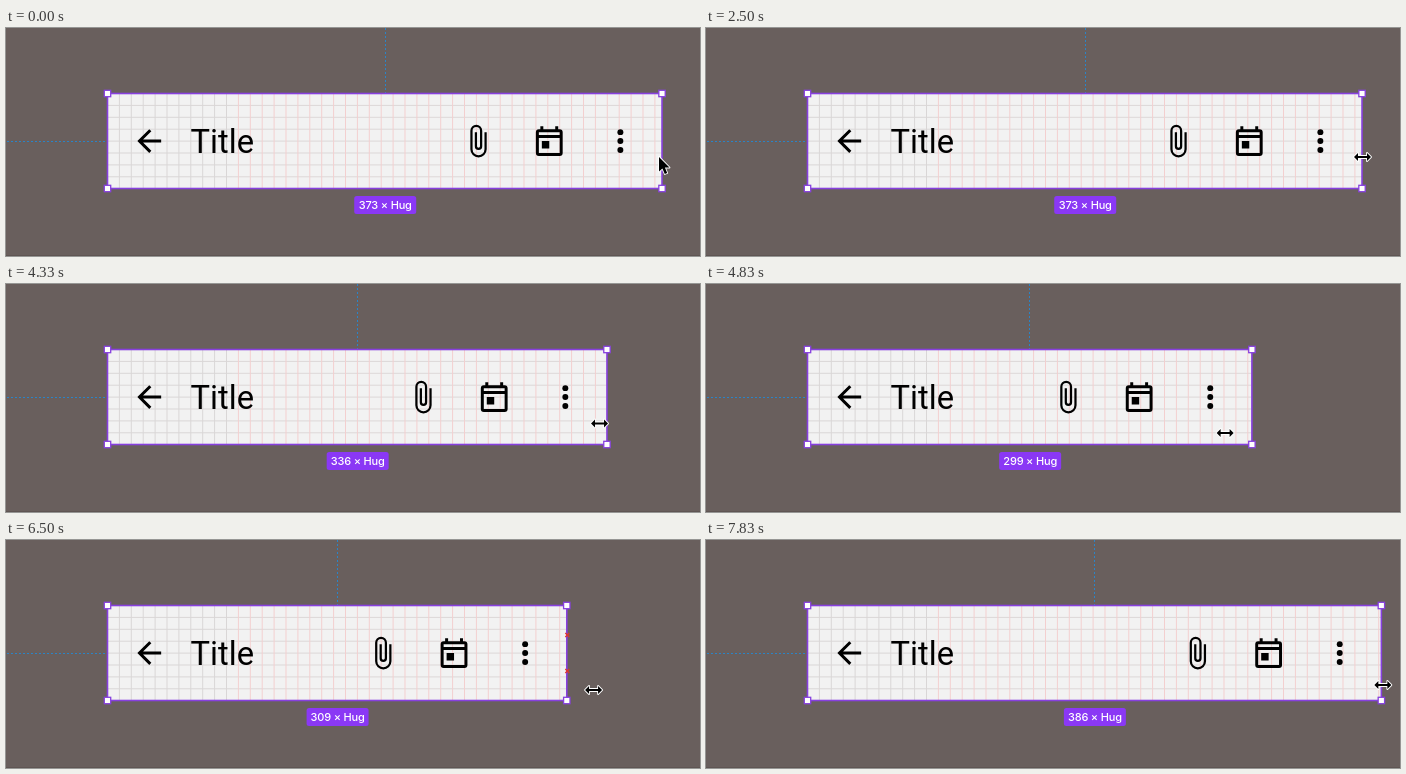
Write an HTML page that moves like this. It is 694 px wide and 228 px high and loops after 8 s.

```html
<!DOCTYPE html>
<html lang="en">
<head>
<meta charset="utf-8">
<title>Resizing an app bar</title>
<style>
  html, body { margin: 0; width: 100%; height: 100%; overflow: hidden; background: #695f5d; }
  svg { display: block; width: 100%; height: 100%; }
  .guide { stroke: #2b84c6; stroke-width: 1; stroke-dasharray: 2 2; }
  .outline { fill: none; stroke: #8740de; stroke-width: 1.6; }
  .handle { fill: #fff; stroke: #8740de; stroke-width: 1.3; }
  .title { font: 400 32.7px Roboto, sans-serif; }
  .size { font: 500 11px Inter, sans-serif; letter-spacing: -.2px; fill: #fff; text-anchor: middle; }
  .cursor { stroke: #fff; stroke-width: 1.8; stroke-linejoin: round; paint-order: stroke; }
  .mark { fill: none; stroke: #e0342b; stroke-width: 1.2; }
</style>
</head>
<body>
<svg viewBox="0 0 694 228">
  <defs>
    <pattern id="cells" patternUnits="userSpaceOnUse" x="101" y="65" width="11.9" height="11.9">
      <path d="M0 .5H11.9M.5 0V11.9" stroke="#d9d6d6"/>
    </pattern>
    <pattern id="pinkCells" patternUnits="userSpaceOnUse" x="101" y="65" width="11.9" height="11.9">
      <path d="M0 .5H11.9" stroke="#dcd7d7"/>
      <path d="M.5 0V11.9" stroke="#f3cfcf"/>
    </pattern>
    <path id="mark" class="mark" d="M-2-2 2 2M-2 2 2-2"/>
    <rect id="handle" class="handle" x="-3.2" y="-3.2" width="6.4" height="6.4"/>
  </defs>

  <rect width="694" height="228" fill="#695f5d"/>
  <rect y="227" width="694" height="1" fill="#5f5553"/>
  <path class="guide" d="M1 113.5H101"/>
  <path class="guide" id="topGuide" d="M.5 0V65"/>

  <rect id="bar" x="101" y="65" height="95.5" fill="#f2f2f2"/>
  <rect x="101" y="65" width="125" height="95.5" fill="url(#cells)"/>
  <rect id="pinkGrid" x="226" y="65" height="95.5" fill="url(#pinkCells)"/>

  <g transform="translate(125.4 95.2) scale(1.488)">
    <path d="M20 11H7.83l5.59-5.59L12 4l-8 8 8 8 1.41-1.41L7.83 13H20z"/>
  </g>
  <text class="title" x="184.6" y="125">Title</text>

  <g id="actions">
    <g transform="translate(-202.1 95.2) scale(1.488)">
      <path d="M16.5 6v11.5a4 4 0 0 1-8 0V5a2.5 2.5 0 0 1 5 0v10.5a1 1 0 0 1-2 0V6H10v9.5a2.5 2.5 0 0 0 5 0V5a4 4 0 0 0-8 0v12.5a5.5 5.5 0 0 0 11 0V6z"/>
    </g>
    <g transform="translate(-130.6 95.2) scale(1.488)">
      <path fill-rule="evenodd" d="M19 4h-1V2h-2v2H8V2H6v2H5a2 2 0 0 0-2 2v14a2 2 0 0 0 2 2h14a2 2 0 0 0 2-2V6a2 2 0 0 0-2-2zM19 20H5V10h14zM19 8H5V6h14zM7 12h5v5H7z"/>
    </g>
    <g transform="translate(-59.5 95.2) scale(1.488)">
      <circle cx="12" cy="6" r="2"/><circle cx="12" cy="12" r="2"/><circle cx="12" cy="18" r="2"/>
    </g>
  </g>

  <rect id="outline" class="outline" x="101.5" y="65.5" height="95"/>
  <use href="#handle" x="101.5" y="65.5"/>
  <use href="#handle" x="101.5" y="160.5"/>
  <g id="rightEdge">
    <use href="#handle" y="65.5"/>
    <use href="#handle" y="160.5"/>
    <g id="marks"><use id="upperMark" href="#mark"/><use id="lowerMark" href="#mark"/></g>
  </g>

  <g id="badge">
    <rect x="-31" y="168" width="62" height="18" rx="2.5" fill="#8a38f5"/>
    <text class="size" id="size" y="181"></text>
  </g>

  <path id="arrow" class="cursor" d="M0 0V14.5L3.4 11.4 5.8 17 8.2 16 5.9 10.6H10.5Z"/>
  <path id="resizer" class="cursor" d="M-8.5 0-4.5-4V-1H4.5V-4L8.5 0 4.5 4V1H-4.5V4Z"/>
</svg>
<script>
const LOOP = 8000, STEPS_PER_MS = 6 / 1000;
const LEFT = 101, SCALE = 1.488;

// Keys are [step, value], six steps per second.
const widthKeys = [[21, 373], [22, 370], [23, 353], [24, 346], [27, 331], [28, 316], [29, 299],
  [30, 281], [31, 268], [32, 260], [34, 254], [36, 254], [37, 270], [39, 309], [40, 327],
  [42, 364], [43, 378], [44, 383], [46, 386], [47, 386], [48, 387]];
const hoverKeys = [[0, 653], [7, 653], [10, 662], [13, 656.5], [20, 656.5]];
const cursorYKeys = [[0, 129], [22, 129], [23, 130], [29, 149], [35, 159], [39, 150], [47, 145]];

const el = {};
document.querySelectorAll('svg [id]').forEach(node => el[node.id] = node);

function valueAt(keys, step) {
  const next = keys.findIndex(([s]) => s > step);
  if (next === 0) return keys[0][1];
  if (next < 0) return keys[keys.length - 1][1];
  const [s0, v0] = keys[next - 1], [s1, v1] = keys[next];
  return v0 + (v1 - v0) * (step - s0) / (s1 - s0);
}

const edgeAt = step => LEFT + SCALE * Math.round(valueAt(widthKeys, step));
const move = (node, x, y = 0) => node.setAttribute('transform', `translate(${x} ${y})`);
const show = (node, on) => node.setAttribute('visibility', on ? 'visible' : 'hidden');

function draw(step) {
  const edge = edgeAt(step), span = edge - LEFT, middle = LEFT + span / 2;
  el.bar.setAttribute('width', span);
  el.pinkGrid.setAttribute('width', edge - 226);
  el.outline.setAttribute('width', span - .5);
  move(el.actions, edge);
  move(el.rightEdge, edge);
  move(el.topGuide, Math.round(middle));
  move(el.badge, middle + .7);
  el.size.textContent = `${Math.round(valueAt(widthKeys, step))} × Hug`;

  show(el.marks, step >= 33 && step <= 41);
  const spread = step < 38 ? 16 : 18;
  move(el.upperMark, .5, 113 - spread);
  move(el.lowerMark, .5, 113 + spread);

  // The dragged edge trails the pointer by one step.
  const x = step < 21 ? valueAt(hoverKeys, step) : edgeAt(step + 1);
  const y = valueAt(cursorYKeys, step);
  const pointing = step < 10;
  show(el.arrow, pointing);
  show(el.resizer, !pointing);
  move(pointing ? el.arrow : el.resizer, x, y);
}

const start = performance.now();
function tick() {
  const time = (performance.now() - start) % LOOP;
  draw(Math.floor(time * STEPS_PER_MS + .05) % 48);
  requestAnimationFrame(tick);
}
tick();
</script>
</body>
</html>
```
